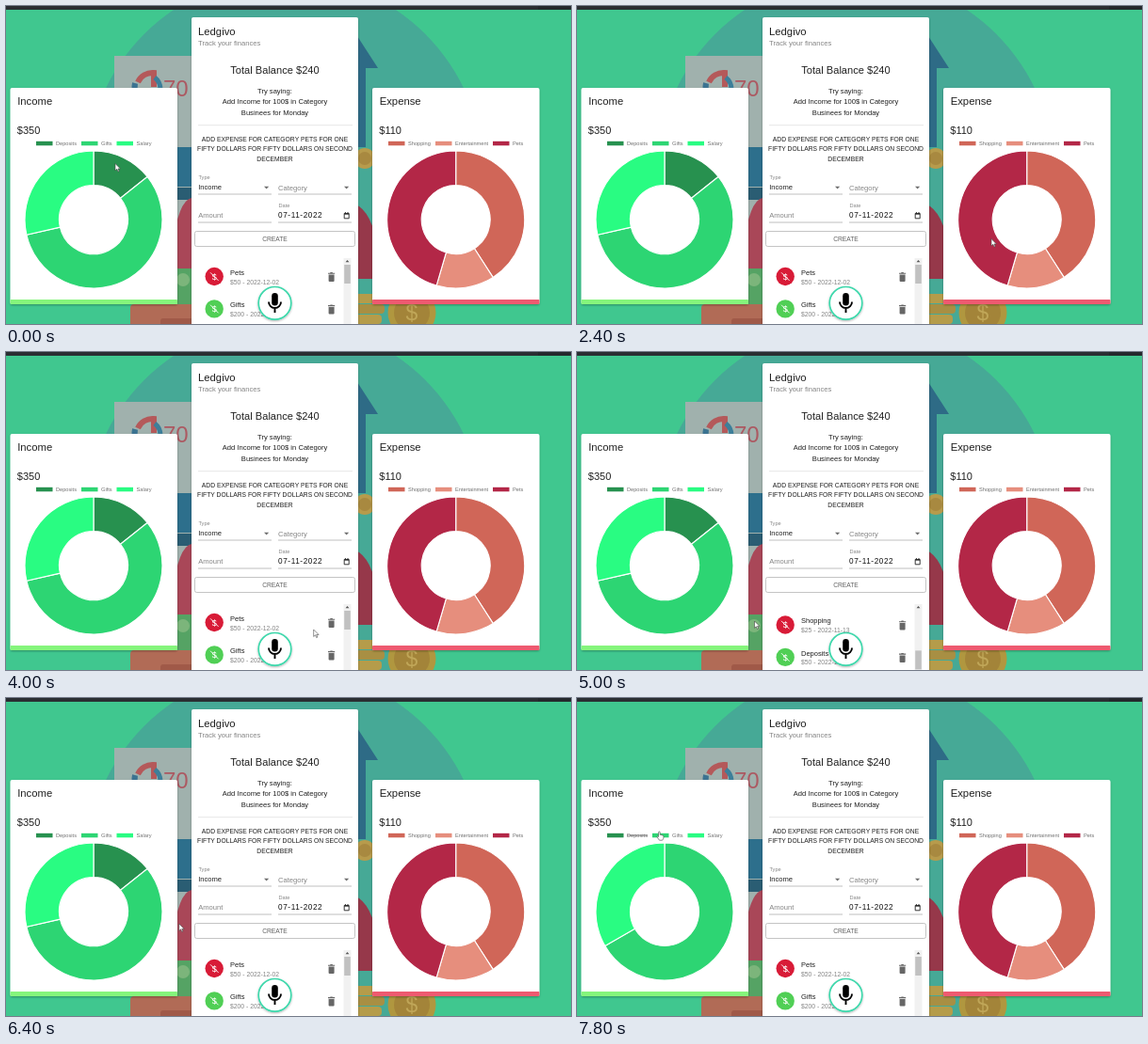
Write an HTML page that moves like this. It is 600 px wide and 338 px high and loops after 8 s.

```html
<!DOCTYPE html>
<html lang="en">
<head>
<meta charset="utf-8">
<title>Finance tracker</title>
<style>
html, body { margin: 0; width: 100%; height: 100%; overflow: hidden; background: #40c78f; }
svg { display: block; width: 100%; height: 100%; font-family: "Liberation Sans", Arial, sans-serif; }
</style>
</head>
<body>
<svg id="stage" viewBox="0 0 600 338"></svg>
<script>
const LOOP = 8000, STEP = 200;
const DARK = '#202020', GREY = '#858585';

const rect = (x, y, w, h, fill, extra = '') =>
  `<rect x="${x}" y="${y}" width="${w}" height="${h}" fill="${fill}" ${extra}/>`;
const circle = (x, y, r, fill, extra = '') =>
  `<circle cx="${x}" cy="${y}" r="${r}" fill="${fill}" ${extra}/>`;
const path = (d, fill, extra = '') => `<path d="${d}" fill="${fill}" ${extra}/>`;
const line = (x1, y, x2, color = '#959595') =>
  path(`M${x1} ${y}H${x2}`, 'none', `stroke="${color}" stroke-width=".6"`);
const text = (x, y, size, str, fill = DARK, extra = '') =>
  `<text x="${x}" y="${y}" font-size="${size}" fill="${fill}" ${extra}>${str}</text>`;
const centered = (y, size, str, fill = DARK) =>
  text(285.5, y, size, str, fill, 'text-anchor="middle"');

function donut(cx, cy, values, colors) {
  const total = values.reduce((a, b) => a + b);
  const point = (r, a) => `${cx + r * Math.sin(a)} ${cy - r * Math.cos(a)}`;
  let angle = 0;
  return values.map((value, i) => {
    const start = angle, sweep = value / total * 2 * Math.PI;
    angle += sweep;
    if (sweep < 0.002) return '';
    const large = +(sweep > Math.PI);
    return path(`M${point(73, start)}A73 73 0 ${large} 1 ${point(73, angle)}` +
      `L${point(36.5, angle)}A36.5 36.5 0 ${large} 0 ${point(36.5, start)}Z`,
      colors[i], 'stroke="#fff" stroke-width="1.1" stroke-linejoin="round"');
  }).join('');
}

const income = {
  x: 4.5, title: 'Income', total: '$350', edge: '#85f57c', values: [50, 200, 100],
  labels: ['Deposits', 'Gifts', 'Salary'], legendX: [32, 80, 117.5],
  colors: ['#27914f', '#2dd573', '#29fc82']
};
const expense = {
  x: 389, title: 'Expense', total: '$110', edge: '#ee5a70', values: [45, 15, 50],
  labels: ['Shopping', 'Entertainment', 'Pets'], legendX: [406, 456, 517],
  colors: ['#d06658', '#e68e7d', '#b32747']
};

const chartCard = (c, id) => rect(c.x, 87, 177.5, 230, '#fff', 'rx="2" filter="url(#shadow)"') +
  rect(c.x, 312, 177.5, 5, c.edge, 'rx="1"') +
  text(c.x + 7.7, 105, 11.3, c.title) + text(c.x + 7.3, 135.5, 11, c.total) +
  c.labels.map((label, i) => rect(c.legendX[i], 143.8, 17.5, 4.5, c.colors[i]) +
    text(c.legendX[i] + 21, 148, 5.65, label, '#707070')).join('') +
  `<g id="${id}"></g>`;

const entries = [
  ['Pets', 50, '12-02', 0], ['Gifts', 200, '12-01', 1], ['Salary', 100, '12-01', 1],
  ['Entertainment', 15, '11-20', 0], ['Shopping', 20, '11-15', 0],
  ['Shopping', 25, '11-13', 0], ['Deposits', 50, '11-07', 1]
];

const listItem = ([name, amount, date, isIncome], i) =>
  `<g transform="translate(0 ${i * 34.4})">` +
  circle(221.2, 287.5, 9.7, isIncome ? '#50cf55' : '#d81b37') +
  text(221.2, 290.7, 9, '$', '#fff', 'text-anchor="middle"') +
  path('M217 283.3l8.6 8.6', 'none', 'stroke="#fff" stroke-width=".9"') +
  text(238, 285.8, 7.5, name) +
  text(238, 295.5, 6.8, `$${amount} - 2022-${date}`, GREY) +
  path('M342.6 285.6h6v6.4q0 1-1 1h-4q-1 0-1-1zM342 283.7h2l.7-.7h1.8l.7.7h2v1.1H342z', '#666') + '</g>';

const dropArrow = (x, y) => path(`M${x - 2.6} ${y}h5.2l-2.6 2.7z`, '#707070');

// The illustration is dimmed, so its tones are muted.
const backdrop =
  circle(296, 179, 211, '#46a996') +
  rect(115, 53, 110, 220, '#a0b1ad') +
  path('M146 101A17 17 0 0 1 137 82', 'none', 'stroke="#3b7391" stroke-width="6"') +
  path('M140 81A17 17 0 0 1 157 71V86', 'none', 'stroke="#b4595a" stroke-width="6"') +
  path('M158 76A16 16 0 0 1 158 101', 'none', 'stroke="#3c7f9a" stroke-width="5"') +
  text(167, 96, 24, '70', '#ac5962') +
  rect(115, 150, 90, 42, '#2d6f8c') + rect(115, 193, 90, 13, '#2a5d73') +
  path('M340 72L364 18 395 66H382V150H340z', '#2e6b86') +
  circle(381, 162, 11, '#b79b4c') + circle(381, 162, 7, '#a88940') +
  path('M176 262Q182 207 197 204H225V285H176z', '#a94758') +
  path('M345 212Q379 198 391 240L398 290H345z', '#96384a') +
  rect(120, 279, 90, 38, '#55a364') + circle(188, 291, 7, '#7cb57b') +
  rect(132, 317, 68, 44, '#b16b56', 'rx="4"') + rect(164, 332, 36, 14, '#a05948', 'rx="3"') +
  [0, 1, 2, 3, 4].map(i => rect(352 + i % 2 * 3, 306 + i * 11, 47, 10, i % 2 ? '#a88f43' : '#b59c4a', 'rx="4"')).join('') +
  circle(431, 326, 25.5, '#b0973f') + circle(431, 326, 19, '#a38439') +
  text(431, 334, 23, '$', '#c0a658', 'text-anchor="middle"');

const mainCard =
  rect(197, 12, 177, 343, '#fff', 'rx="2" filter="url(#shadow)"') +
  text(204, 31, 11.3, 'Ledgivo') + text(204, 42.4, 7.65, 'Track your finances', GREY) +
  centered(71.8, 11.1, 'Total Balance $240') +
  centered(93, 7.6, 'Try saying:') +
  centered(104, 7.6, 'Add Income for 100$ in Category') +
  centered(115.7, 7.6, 'Businees for Monday') +
  line(204, 126.7, 368, '#d5d5d5') +
  centered(144, 6.75, 'ADD EXPENSE FOR CATEGORY PETS FOR ONE') +
  centered(154.2, 6.75, 'FIFTY DOLLARS FOR FIFTY DOLLARS ON SECOND') +
  centered(164.7, 6.75, 'DECEMBER') +
  text(204.5, 183.7, 5.6, 'Type', GREY) + text(204.2, 195.2, 7.6, 'Income') +
  text(289, 195.7, 7.6, 'Category', GREY) +
  dropArrow(276.6, 191.8) + dropArrow(361.6, 191.8) +
  line(204, 200, 282) + line(289, 200, 367) +
  text(204.2, 225.3, 7.6, 'Amount', GREY) + text(289.5, 213.7, 5.6, 'Date', GREY) +
  text(289, 225.3, 8.2, '07-11-2022', '#111', 'letter-spacing=".6"') +
  path('M359.2 220.5h5v5.3h-5zM359.2 221.2h5M360.4 219v1.5M363 219v1.5', 'none', 'stroke="#222" stroke-width=".9"') +
  line(204, 230, 282) + line(289, 230, 367) +
  rect(200.5, 239.5, 170, 16, '#fff', 'rx="2" stroke="#b5b5b5" stroke-width=".8"') +
  centered(249.8, 6.7, 'CREATE', '#606060') +
  `<g clip-path="url(#listClip)"><g id="list">${entries.map(listItem).join('')}</g></g>` +
  rect(358.5, 268, 8, 77, '#f1f1f1') +
  path('M360.6 272.2l1.9-2.2 1.9 2.2zM360.6 341l1.9 2.2 1.9-2.2z', '#555') +
  rect(359.2, 275, 6.6, 20, '#c1c1c1', 'id="thumb"');

const tooltip = '<g id="tooltip">' +
  path('M428 275.8H481.5q2.5 0 2.5 2.5v1l2.4 2.2-2.4 2.2v1q0 2.5-2.5 2.5H428q-2.5 0-2.5-2.5v-6.4q0-2.5 2.5-2.5z', '#222') +
  rect(428.5, 279, 5.5, 5.5, '#e68e7d', 'stroke="#fff" stroke-width=".6"') +
  text(435.5, 283.6, 5.65, 'Entertainment: 15', '#fff') + '</g>';

const mic = circle(285.5, 315.8, 17.3, '#fff', 'stroke="#3cd8ab" stroke-width="1.7" filter="url(#shadow)"') +
  rect(282.2, 305, 6.6, 13.6, '#000', 'rx="3.3"') +
  path('M279 314.5a6.5 6.5 0 0 0 13 0M285.5 321v5', 'none', 'stroke="#000" stroke-width="1.9"');

const stage = document.getElementById('stage');
stage.innerHTML = `<defs>
  <filter id="shadow" x="-10%" y="-10%" width="120%" height="120%">
    <feDropShadow dx="0" dy="1" stdDeviation="1" flood-opacity=".3"/></filter>
  <clipPath id="listClip"><rect x="198" y="268" width="170" height="77"/></clipPath></defs>` +
  rect(0, 0, 600, 338, '#40c78f') +
  `<g id="page">${backdrop}${chartCard(income, 'incomeChart')}${chartCard(expense, 'expenseChart')}` +
  path('M53 146H75.2', 'none', 'id="strike" stroke="#555" stroke-width=".7"') +
  `${mainCard}${tooltip}</g>` +
  rect(0, 0, 600, 4, '#2a2e32') + rect(565, 0, 35, 4, '#24282c') + mic +
  `<g id="cursor">` +
  path('M0 0V7.4L1.8 5.8 3 8.5 4.2 8 3 5.4H5.4z', '#fff', 'id="arrow" stroke="#444" stroke-width=".6"') +
  path('M1.6 4.6V.9q0-.9.8-.9t.8.9V3.3q3.8 0 3.8 2.3-.1 2.6-1.4 3.6H2.5L0 5.7q.3-1.3 1.6-.3z', '#fff',
    'id="hand" stroke="#444" stroke-width=".6"') + '</g>';

const el = id => document.getElementById(id);
const show = (id, visible) => el(id).setAttribute('visibility', visible ? 'visible' : 'hidden');
const clamp = v => Math.max(0, Math.min(1, v));

// Each key is [time, ...values]; values are eased between keys.
function track(keys, t) {
  const next = keys.findIndex(k => k[0] > t);
  if (next < 0) return keys.at(-1).slice(1);
  const a = keys[next - 1], b = keys[next];
  const p = (t - a[0]) / (b[0] - a[0]), eased = p * p * (3 - 2 * p);
  return a.slice(1).map((v, i) => v + (b[i + 1] - v) * eased);
}

const cursorKeys = [
  [0, 116, 167.5], [400, 116, 167.5], [1400, 397.5, 175], [2000, 440, 215], [2800, 440, 280],
  [3200, 431.5, 281], [3600, 431.5, 281], [4200, 290, 300], [4600, 270, 298], [5000, 188.5, 286],
  [5400, 233.5, 272], [5800, 233.5, 266], [6400, 183.8, 240], [7000, 62, 144], [7400, 62, 144], [7800, 85, 142]
];
const listKeys = [[0, 0], [4000, 0], [4800, 169.5], [5400, 169.5], [5800, 21], [6000, 0]];
const pageKeys = [[0, 0], [5000, 0], [5400, 38.5], [6000, 38.5], [6400, 0]];
const CLICK = 6900;

function draw(time) {
  const t = Math.floor(time % LOOP / STEP) * STEP;
  const [x, y] = track(cursorKeys, t), [list] = track(listKeys, t), [page] = track(pageKeys, t);
  el('page').setAttribute('transform', `translate(0 ${-page})`);
  el('list').setAttribute('transform', `translate(0 ${-list})`);
  el('thumb').setAttribute('y', 275 + list * 0.25);
  el('cursor').setAttribute('transform', `translate(${x} ${y})`);

  const hiding = 1 - (1 - clamp((t - CLICK) / 900)) ** 4;
  const [deposits, ...others] = income.values;
  el('incomeChart').innerHTML = donut(93, 227, [deposits * (1 - hiding), ...others], income.colors);

  const hovered = t >= 2800 && t < 3800;
  const [shopping, entertainment, pets] = expense.colors;
  el('expenseChart').innerHTML =
    donut(477.7, 227, expense.values, [shopping, hovered ? '#e66c50' : entertainment, pets]);

  const overLegend = t >= 6800;
  show('tooltip', hovered);
  show('strike', t >= CLICK);
  show('hand', overLegend);
  show('arrow', !overLegend);
}

function tick() {
  draw(performance.now());
  requestAnimationFrame(tick);
}
tick();
</script>
</body>
</html>
```
